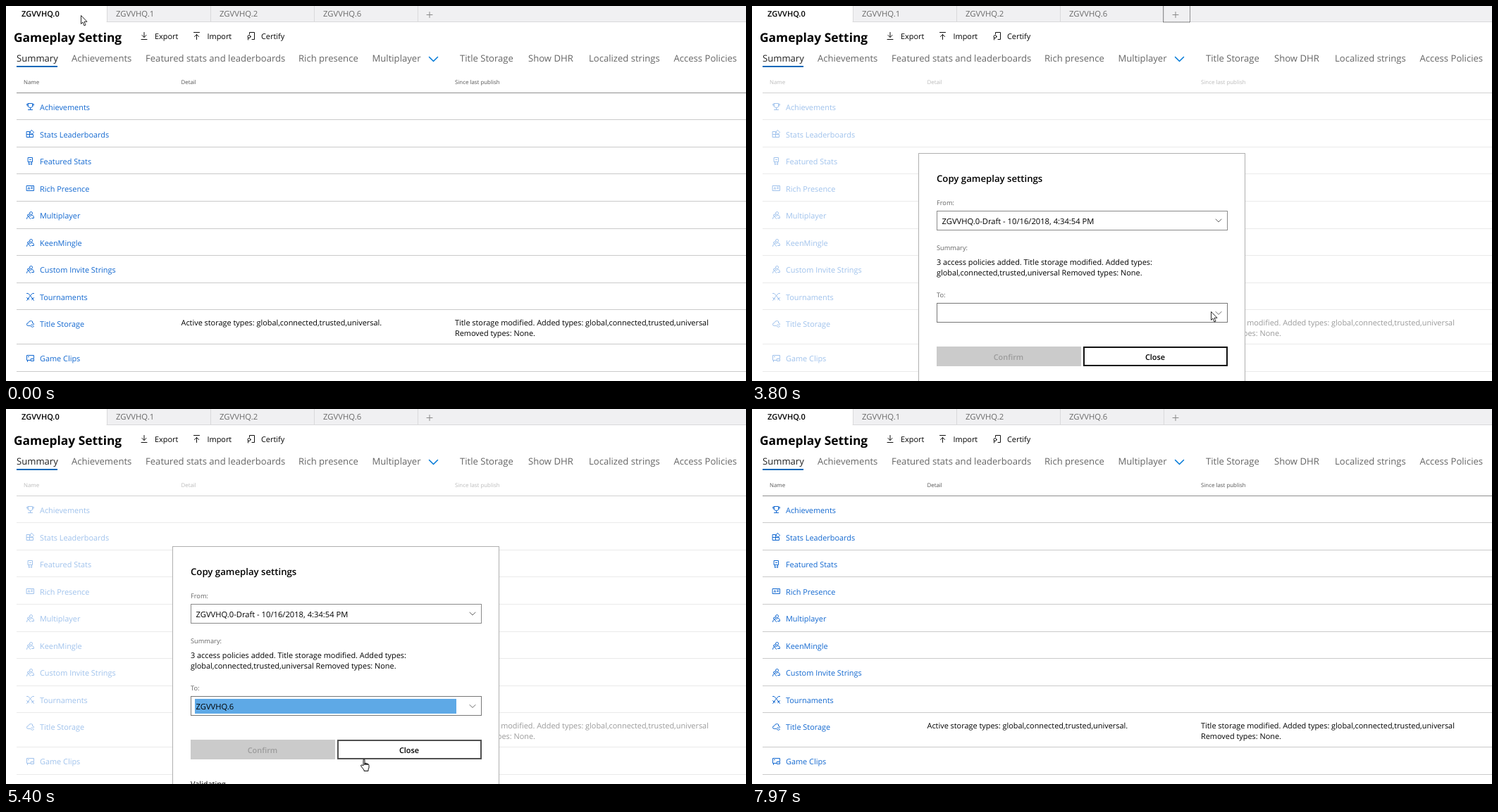
An HTML page for the animation above (8370 ms loop, 1050x533 px).

```html
<!DOCTYPE html>
<html lang="en">
<head>
<meta charset="utf-8">
<title>Gameplay settings</title>
<style>
html, body { margin: 0; width: 100%; height: 100%; overflow: hidden; background: #fff; }
svg { display: block; font: 10.9px "Open Sans", "Noto Sans", sans-serif; text-rendering: geometricPrecision; }
text { fill: #000; white-space: pre; }
.tab { font-size: 11.3px; fill: #6b6b6b; }
.tab.on { font-size: 11px; font-weight: 600; fill: #000; }
.nav text { font-size: 13.1px; fill: #666; }
.nav .on { fill: #222; }
.head { font-size: 7.9px; fill: #555; }
.link { fill: #1268d0; }
.label { font-size: 9.25px; fill: #666; }
.value { font-size: 11.2px; }
.bold { font-weight: 600; }
.title { font-size: 13.2px; }
.mid { text-anchor: middle; }
.line { fill: none; stroke-linecap: round; stroke-linejoin: round; }
.blue { stroke: #1268d0; }
.dark { stroke: #111; }
.grey { stroke: #666; }
</style>
</head>
<body>
<svg width="1050" height="533" viewBox="0 0 1050 533">
  <defs>
    <path id="trophy" d="M3 1H9V5Q9 7 6 7T3 5ZM3 2H1Q1 5 3 5M9 2H11Q11 5 9 5M6 7V10M3 10H9"/>
    <path id="grid" d="M1 2H5V10H1ZM1 6H10V10H5M8 0 11 3 8 6 6 3Z"/>
    <path id="medal" d="M3 1H9V7H3ZM4 7V11L6 10 8 11V7M5 4H7"/>
    <path id="card" d="M1 2H11V9H1ZM3 7 4 4 5 7M7 4H9M7 6H9"/>
    <path id="people" d="M5 3A2 2 0 1 1 9 3 2 2 0 1 1 5 3M2 6A1 1 0 1 1 5 6 1 1 0 1 1 2 6M1 11Q1 8 3 8T6 11M6 7Q11 4 11 10H8"/>
    <path id="swords" d="M1 1H3L10 9M11 1H9L2 9M1 11 4 8M11 11 8 8M1 7 4 10M11 7 8 10"/>
    <path id="cloud" d="M5 9H3Q1 9 1 7T3 5Q4 2 7 2T9 5Q11 5 11 7M6 9Q8 6 10 8M11 10Q9 12 7 10"/>
    <path id="clip" d="M6 9H1V2H11V6M2 9V11M7 7H11V10H7ZM3 4H4"/>
    <path id="chevron" class="line" d="M-4-2 0 2 4-2"/>
    <path id="down" d="M4 0V7M1 4 4 7 7 4M0 10H8"/>
  </defs>
  <rect width="1050" height="533" fill="#fff"/>

  <rect x="143" width="907" height="23" fill="#f0f0f2"/>
  <path class="line" stroke="#d9d9db" d="M143 22.5H1050"/>
  <g id="tabs"></g>
  <path class="line" stroke="#8a8a8a" d="M597 12.500h8m-4-4v8"/>
  <rect id="focus" x="583.5" y="-.5" width="38" height="23.5" fill="none" stroke="#333" stroke-dasharray="1 1"/>

  <text x="11" y="51" font-size="17.4" font-weight="700">Gameplay Setting</text>
  <g class="line dark">
    <use href="#down" x="192" y="37.5"/>
    <use href="#down" transform="translate(266.5 47.5) scale(1 -1)"/>
    <path d="M345.500 40V37.500H352.500V47.500H349M343.500 45V48"/>
    <circle cx="345" cy="43.5" r="2"/>
  </g>
  <text x="211" y="47">Export</text>
  <text x="285.5" y="47">Import</text>
  <text x="362" y="47">Certify</text>

  <g class="nav">
    <text class="on" x="15" y="79">Summary</text>
    <text x="93" y="79">Achievements</text>
    <text x="198" y="79">Featured stats and leaderboards</text>
    <text x="415" y="79">Rich presence</text>
    <text x="519.5" y="79">Multiplayer</text>
    <text x="644" y="79">Title Storage</text>
    <text x="741" y="79">Show DHR</text>
    <text x="827" y="79">Localized strings</text>
    <text x="947.5" y="79">Access Policies</text>
  </g>
  <rect x="15" y="85" width="58" height="2" fill="#0067b8"/>
  <use href="#chevron" stroke="#0078d7" transform="translate(606.5 75.5) scale(1.5)"/>

  <g id="page">
    <text class="head" x="25" y="111">Name</text>
    <text class="head" x="248.5" y="111">Detail</text>
    <text class="head" x="637" y="111">Since last publish</text>
    <rect x="15" y="123" width="1035" height="1" fill="#8f8f8f"/>
    <g id="rows"></g>
    <text x="248.5" y="453.5">Active storage types: global,connected,trusted,universal.</text>
    <text x="637" y="453.5">Title storage modified. Added types: global,connected,trusted,universal</text>
    <text x="637" y="468.5">Removed types: None.</text>
  </g>

  <g id="dialog"><g id="shift">
    <rect x="236.5" y="209.5" width="463" height="420" fill="#fff" stroke="#b0b0b0"/>
    <text class="bold title" x="262" y="250">Copy gameplay settings</text>
    <text class="label" x="262" y="283">From:</text>
    <rect x="262.5" y="291.5" width="412" height="27" fill="#fff" stroke="#8a8a8a"/>
    <text class="value" x="269.5" y="309.5">ZGVVHQ.0-Draft - 10/16/2018, 4:34:54 PM</text>
    <use href="#chevron" class="grey" x="662" y="305"/>
    <g id="summary">
      <text class="label" x="262" y="347">Summary:</text>
      <text x="262" y="368">3 access policies added. Title storage modified. Added types:</text>
      <text x="262" y="383">global,connected,trusted,universal Removed types: None.</text>
    </g>
    <g id="lower">
      <text class="label" x="262" y="414">To:</text>
      <rect x="262.5" y="422.5" width="412" height="27" fill="#fff" stroke="#777"/>
      <rect id="picked" x="268" y="426" width="371" height="21" fill="#5ea9e6"/>
      <text id="choice" class="value" x="269.5" y="440.5">ZGVVHQ.6</text>
      <use href="#chevron" class="grey" x="662" y="436.5"/>
      <rect id="confirm" x="262" y="484" width="205" height="28"/>
      <rect id="ring" x="261.5" y="483.5" width="205" height="28" fill="none" stroke="#444" stroke-dasharray="1 1"/>
      <text id="confirmText" class="bold mid" x="364" y="502.5">Confirm</text>
      <rect id="close" x="471" y="485" width="203" height="26" fill="#fff" stroke-width="2"/>
      <text class="bold mid" x="572" y="502.5">Close</text>
      <text id="validating" x="262" y="550.5">Validating...</text>
      <g id="warning">
        <rect x="262" y="527" width="413" height="70" fill="#fff799"/>
        <path class="line dark" d="M278.500 540 285 553H272ZM278.500 545V549M278.500 551V551.200"/>
        <circle cx="321" cy="545.5" r="1.6"/>
        <text x="330" y="548.5">There must be at least one rich presence string configured</text>
      </g>
    </g>
    <g id="menu">
      <rect x="263" y="423" width="411" height="160" fill="#fff" stroke="#111" stroke-width="2"/>
      <rect id="bar" x="264" y="429" width="397" height="15" fill="#99c9ef"/>
      <g id="options"></g>
      <rect x="661" y="424" width="12" height="120" fill="#ececec"/>
      <path class="line grey" d="M664 432 667 429 670 432"/>
      <rect x="661" y="436" width="12" height="94" fill="#b8b8b8"/>
    </g>
  </g></g>

  <g id="cursor" fill="#fff" stroke="#111" stroke-linejoin="round">
    <path id="arrow" stroke-width=".9" d="M.5.5V12.500L3 10 5 15 7 14 5 9.300H9Z"/>
    <path id="hand" d="M-1 10V2Q-1 .7 0 .7T1 2V9 6.500H3V9 7H5V9 7.500Q7 7.500 7 9.500V13L6 15V17.500H0V16L-4 11Q-5 9-4 9-2 9-1 10Z"/>
  </g>
</svg>
<script>
const LOOP = 8370;
const $ = id => document.getElementById(id);
const fill = (id, items, draw) => { $(id).innerHTML = items.map(draw).join(''); };

fill('tabs', [0, 1, 2, 6], (n, i) =>
  `<text id="tab${i}" class="tab${i ? '' : ' on'}" x="${i ? 9 + 147 * i : 22}" y="14.5">ZGVVHQ.${n}</text>
   <rect x="${143 + 147 * i}" width="1" height="22" fill="#d9d9db"/>`);

// rows have one pitch; those after Title Storage sit lower by its second text line
const PITCH = 38.55, EXTRA = 10.5;
fill('rows', [
  'trophy Achievements', 'grid Stats Leaderboards', 'medal Featured Stats', 'card Rich Presence',
  'people Multiplayer', 'people KeenMingle', 'people Custom Invite Strings', 'swords Tournaments',
  'cloud Title Storage', 'clip Game Clips'
], (row, i) => {
  const [icon, ...name] = row.split(' ');
  const y = 144 + PITCH * i + (i > 8 ? EXTRA : 0);
  const rule = Math.floor(123.3 + PITCH * (i + 1) + (i > 7 ? EXTRA : 0));
  return `<use href="#${icon}" class="line blue" x="28.5" y="${Math.round(y) - 6.5}"/>
    <text class="link" x="48" y="${y + 4}">${name.join(' ')}</text>
    <rect x="15" y="${rule}" width="1035" height="1" fill="#cacaca"/>`;
});

fill('options', ['ZGVVHQ.0', 'ZGVVHQ.1', 'ZGVVHQ.2', 'ZGVVHQ.6', 'CERT', 'CERT.DEBUG'], (s, i) =>
  `<text class="value" x="269.5" y="${456.5 + i * 16}">${s}</text>`);

// keyframes from times in ms
let css = '';
const track = (id, prop, keys, ease = 'step-end') => {
  const body = keys.map(([t, v]) => `${(t / LOOP * 100).toFixed(3)}%{${prop}:${v}}`).join('');
  css += `@keyframes k-${id}{${body}}#${id}{animation:k-${id} ${LOOP}ms ${ease} infinite}`;
};
const during = (id, prop, off, on, a, b) => track(id, prop, [[0, off], [a, on], [b, off]]);
const show = (id, a, b) => during(id, 'opacity', 0, 1, a, b);
const moveY = (id, keys) => track(id, 'transform', keys.map(([t, y]) => [t, `translateY(${y}px)`]));

// story: moments of the dialog in ms
const add = 2050, open = 2130, ready = 3000, drop = 3960, pick = 5020,
  check = 5100, warn = 5950, press = 6420, sent = 6560, done = 7260;

for (let i = 1; i < 4; i++) during('tab' + i, 'fill', '#6b6b6b', '#222', 380 * i - 70, 380 * i + 310);
show('focus', add, drop);
track('page', 'opacity', [[0, 1], [add, 1], [add + 320, .4], [done, .4], [done + 480, 1], [LOOP, 1]], 'linear');

show('dialog', open, done);
moveY('shift', [[0, 33], [ready, 0], [check, -14], [warn, -24]]);
moveY('lower', [[0, -67], [ready, 0]]);
show('summary', ready, done);
show('menu', drop, pick);
moveY('bar', [0, 1, 2, 3, 4].map(i => [i && 4430 + 76 * i, 16 * i]));
show('picked', pick, press);
show('choice', pick, done);
show('validating', check, warn);
show('warning', warn, done);
during('confirm', 'fill', '#cbcbcb', '#999', warn, sent);
during('confirmText', 'fill', '#9c9c9c', '#fff', warn, sent);
show('ring', press, sent);
during('close', 'stroke', '#111', '#505050', 5250, 5820);

// each leg: start, end, where to; the pointer rests between legs
const place = (x, y) => `translate(${x}px,${y}px)`;
const keys = [[0, place(106, 13)]];
for (const [start, end, x, y] of [
  [200, 600, 260, 21], [600, 970, 427, 10], [1040, 1750, 608, 9],
  [2760, 3700, 651, 434], [drop, 4480, 608, 439], [4480, 4780, 585, 502],
  [pick, 5400, 508, 497], [5800, 6080, 153, 472], [6080, press, 414, 468],
  [6729, 6730, 463, 468], [6960, 7040, 666, 508], [7190, 7450, 690, 540]
]) keys.push([start, keys.at(-1)[1]], [end, place(x, y)]);
track('cursor', 'transform', [...keys, [LOOP, keys.at(-1)[1]]], 'linear');

// the pointer is a hand over anything clickable
const swaps = [0, 310, 2860, 5250, 5820, 6170, sent];
track('arrow', 'opacity', swaps.map((t, i) => [t, 1 - i % 2]));
track('hand', 'opacity', swaps.map((t, i) => [t, i % 2]));

document.head.appendChild(document.createElement('style')).textContent = css;
</script>
</body>
</html>
```
